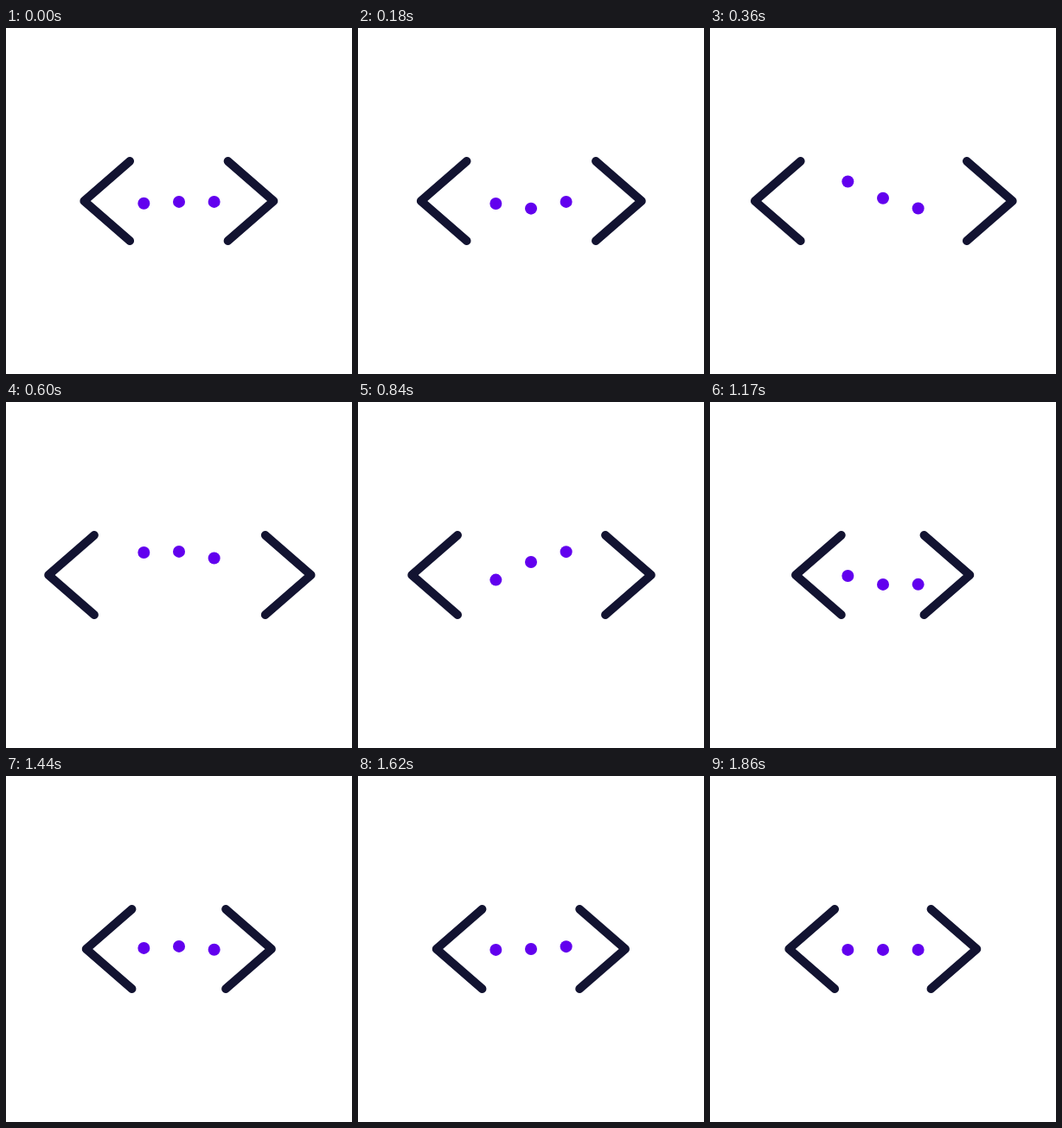
Animation of 400 by 400 pixels, one loop 1.89 s. Source, as an HTML page with a canvas:

```html
<!DOCTYPE html>
<html lang="en">
<head>
<meta charset="utf-8">
<title>Code brackets</title>
<style>
  html, body { margin: 0; width: 100%; height: 100%; overflow: hidden; background: #fff; }
  canvas { display: block; width: 100vw; height: 100vh; object-fit: contain; }
</style>
</head>
<body>
<canvas id="stage" width="400" height="400"></canvas>
<script>
const ctx = document.getElementById('stage').getContext('2d');
const LOOP = 1890, STEP = 30, DELAY = 133;
const INK = '#121331', ACCENT = '#6200ee';
const MID = 200, DOT_Y = 200.9, DOT_GAP = 40.65;

const ease = u => u * u * u * (10 - 15 * u + 6 * u * u);

// Eased travel from pose to pose, given as [time, value]
function pose(keys, t) {
  let [t0, value] = keys[0];
  for (const [t1, next] of keys) {
    if (t < t1) return value + (next - value) * ease(Math.max(0, (t - t0) / (t1 - t0)));
    [t0, value] = [t1, next];
  }
  return value;
}

// Brackets: open, snap past rest, settle
const SPREAD = [[-80, -0.7], [476, 42.5], [620, 42.5], [1220, -8.8], [1560, 0], [1860, -0.7]];
// Dots: crouch, jump, hang, drop, rebound, rest
const BOUNCE = [[-30, 0], [55, 7.8], [475, -28], [535, -28], [970, 11], [1290, -4], [1590, 0]];

function bracket(tip, dir) {
  const arm = tip - dir * 52.9;
  ctx.beginPath();
  ctx.moveTo(arm, MID - 46);
  ctx.lineTo(tip, MID);
  ctx.lineTo(arm, MID + 46);
  ctx.stroke();
}

function dot(x, y) {
  ctx.beginPath();
  ctx.arc(x, y, 7, 0, Math.PI * 2);
  ctx.fill();
}

function draw() {
  const t = Math.floor(performance.now() % LOOP / STEP) * STEP;
  ctx.fillStyle = '#fff';
  ctx.fillRect(0, 0, 400, 400);

  ctx.strokeStyle = INK;
  ctx.lineWidth = 9.8;
  ctx.lineCap = ctx.lineJoin = 'round';
  const shift = pose(SPREAD, t);
  bracket(90.6 - shift * 0.976, -1);
  bracket(309.1 + shift * 1.024, 1);

  ctx.fillStyle = ACCENT;
  for (let i = 0; i < 3; i++) {
    dot(MID + (i - 1) * DOT_GAP, DOT_Y + pose(BOUNCE, t - i * DELAY));
  }
  requestAnimationFrame(draw);
}
draw();
</script>
</body>
</html>
```
